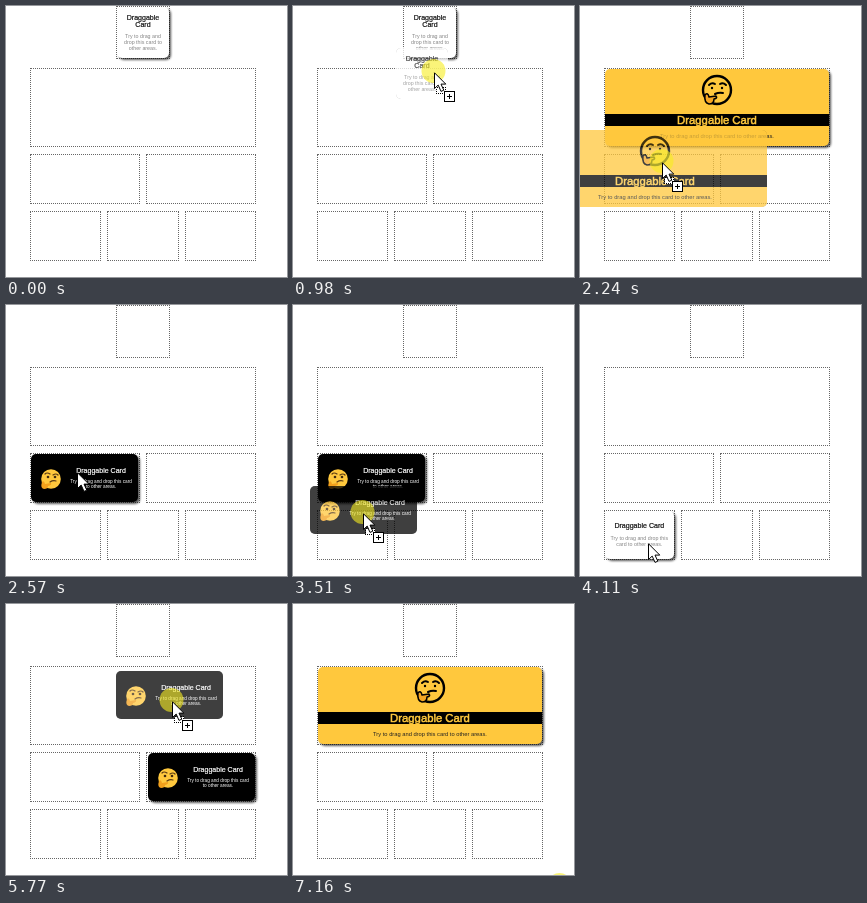
Write an HTML page that moves like this. It is 281x271 px and loops after 7.23 s.

```html
<!DOCTYPE html>
<html lang="en">
<head>
<meta charset="utf-8">
<title>Draggable card</title>
<style>
  html, body { margin: 0; width: 100%; height: 100%; overflow: hidden; background: #fff; }
  svg { position: absolute; inset: 0; width: 100%; height: 100%; }
  text { font-family: "Liberation Sans", Arial, sans-serif; text-anchor: middle; }
  .title { font-size: 7.05px; stroke: currentColor; stroke-width: .2px; fill: currentColor; }
  .big { font-size: 11.3px; stroke-width: .5px; }
  .note { font-size: 5.32px; fill: #858585; }
  .zone { position: absolute; box-sizing: border-box; border: 1px dotted #666; }
  .line { fill: none; stroke-linecap: round; stroke-linejoin: round; }
  #placed { filter: drop-shadow(2px 2px 1px rgba(0, 0, 0, .65)); }
  #ghost { opacity: .75; filter: drop-shadow(.5px 0 .5px rgba(0, 0, 0, .4)); }
</style>
</head>
<body>
<div id="zones"></div>
<svg viewBox="0 0 281 271">
  <defs>
    <g id="small" color="#111">
      <rect width="52" height="51" rx="5" fill="#fff"/>
      <text class="title" x="26" y="13">Draggable</text>
      <text class="title" x="26" y="20">Card</text>
      <text class="note" x="26" y="31">Try to drag and</text>
      <text class="note" x="26" y="37">drop this card to</text>
      <text class="note" x="26" y="43">other areas.</text>
    </g>

    <g id="wide" color="#ffc83d">
      <rect width="224" height="77" rx="5" fill="#ffc83d"/>
      <rect y="45" width="224" height="12"/>
      <g transform="translate(112 21)" class="line" stroke="#000" stroke-width="2">
        <circle r="14" stroke-width="2.4"/>
        <path d="M-8-5Q-5-8-2-6M3-6Q6-8 9-5M-2 4Q2 2 6 3"/>
        <path d="M-12 5Q-9 2-8 7L-1 6Q1 8-3 9Q-3 14-8 14Q-13 13-12 5Z" fill="#f5a623" stroke-width="1.5"/>
        <circle cx="-5" cy="-2" r="1.2" fill="#000" stroke="none"/>
        <circle cx="5" cy="-2" r="1.2" fill="#000" stroke="none"/>
      </g>
      <text class="title big" x="112" y="55">Draggable Card</text>
      <text class="note" x="112" y="69" style="font-size:5.75px;fill:#222">Try to drag and drop this card to other areas.</text>
    </g>

    <g id="half" color="#fff">
      <rect width="107" height="48" rx="5"/>
      <g transform="translate(20 25)">
        <circle r="9.8" fill="#ffc83d"/>
        <path class="line" d="M-6-5Q-4-7-1-5M2-4Q5-6 7-4M-1 3Q2 1 5 2" stroke="#5a3a12" stroke-width="1.2"/>
        <circle cx="-3" cy="-2" r="1.3" fill="#402a10"/>
        <circle cx="4" cy="-2" r="1.3" fill="#402a10"/>
        <path d="M-9 3Q-7 1-6 5L0 4Q1 6-3 7Q-3 10-7 10Q-11 9-9 3Z" fill="#f2a01c"/>
      </g>
      <text class="title" x="70" y="19">Draggable Card</text>
      <g style="font-size:4.73px" fill="#fff">
        <text x="70" y="28.8">Try to drag and drop this card</text>
        <text x="70" y="34">to other areas.</text>
      </g>
    </g>

    <g id="third" color="#111">
      <rect width="69" height="48" rx="5" fill="#fff"/>
      <text class="title" x="34.3" y="16.7">Draggable Card</text>
      <text class="note" x="34.3" y="29">Try to drag and drop this</text>
      <text class="note" x="34.3" y="35">card to other areas.</text>
    </g>
  </defs>

  <use id="placed"/>
  <use id="ghost"/>
  <g id="pointer">
    <circle id="press" cx="-.5" cy="-1" r="12" fill="#f6ec20" opacity=".6"/>
    <g id="copy" stroke="#000" fill="#fff" shape-rendering="crispEdges">
      <rect x="2.5" y="15.5" width="9" height="6" stroke-dasharray="1 1"/>
      <rect x="10.5" y="19.5" width="10" height="10"/>
      <path d="M13 24.5H18M15.5 22V27"/>
    </g>
    <path d="M.5.8V16.5L4.2 13.1L7 19.4L9.8 18.2L7 12.1H11.8Z" fill="#fff" stroke="#000"/>
  </g>
</svg>

<script>
const LOOP = 7230, STEP = 65;
const el = id => document.getElementById(id);

// x, y, width, height of the drop areas
const zones = [
  [110, 0, 54, 53], [24, 62, 226, 79],
  [24, 148, 110, 50], [140, 148, 110, 50],
  [24, 205, 71, 50], [101, 205, 72, 50], [179, 205, 71, 50]
];
el("zones").innerHTML = zones.map(([x, y, w, h]) =>
  `<div class="zone" style="left:${x}px;top:${y}px;width:${w}px;height:${h}px"></div>`).join("");

// Where the card rests from a given time on
const rests = [
  { at: 0, card: "small", x: 111, y: 1 },
  { at: 1440, card: "wide", x: 25, y: 63 },
  { at: 2440, card: "half", x: 25, y: 149 },
  { at: 3910, card: "third", x: 25, y: 206 },
  { at: 4970, card: "half", x: 142, y: 149 },
  { at: 5970, card: "wide", x: 25, y: 63 }
];

const drags = [
  { press: 780, grab: 850, drop: 1440, release: 1640, x: 149, y: 25 },
  { press: 2040, grab: 2040, drop: 2440, release: 2570, x: 144, y: 95 },
  { press: 3180, grab: 3245, drop: 3910, release: 4040, x: 78, y: 176 },
  { press: 4310, grab: 4375, drop: 4970, release: 5170, x: 68, y: 237 },
  { press: 5365, grab: 5430, drop: 5970, release: 6035, x: 198, y: 179 },
  { press: 7090, grab: LOOP, drop: LOOP, release: LOOP, x: 267, y: 282 }
];

// Pointer moves: start time, number of steps, end point
const moves = [
  [190, 3, 178, 121], [520, 5, 149, 25], [850, 6, 132, 107],
  [1640, 3, 144, 95], [2040, 5, 71, 167], [2840, 4, 78, 176],
  [3245, 9, 64, 232], [3975, 3, 68, 238], [4375, 9, 204, 175],
  [5170, 4, 198, 179], [5430, 6, 166, 97], [6100, 9, 246, 228],
  [6700, 4, 260, 284], [7090, 1, 267, 282]
];

const ease = p => (p + p * p * (3 - 2 * p)) / 2;

function pointerAt(t) {
  let x = 277, y = 316;
  for (const [start, steps, toX, toY] of moves) {
    if (t < start) break;
    const done = Math.min(1, (Math.floor((t - start) / STEP) + 1) / steps);
    const p = ease(done);
    x += (toX - x) * p;
    y += (toY - y) * p;
  }
  return { x: Math.round(x), y: Math.round(y) };
}

function place(node, card, x, y) {
  node.setAttribute("href", "#" + card);
  node.setAttribute("x", x);
  node.setAttribute("y", y);
}

const show = (node, on) => node.setAttribute("display", on ? "inline" : "none");

function draw(now) {
  const t = now % LOOP;
  const { x, y } = pointerAt(t);
  const rest = rests.findLast(r => t >= r.at);
  const drag = drags.find(d => t >= d.press && t < d.release);
  const dragging = Boolean(drag) && t >= drag.grab && t < drag.drop;

  place(el("placed"), rest.card, rest.x, rest.y);
  if (dragging) place(el("ghost"), rest.card, rest.x + x - drag.x, rest.y + y - drag.y);
  show(el("ghost"), dragging);
  show(el("copy"), dragging);
  show(el("press"), drag);
  el("pointer").setAttribute("transform", `translate(${x} ${y})`);
}

const origin = performance.now();
function tick() {
  draw(performance.now() - origin);
  requestAnimationFrame(tick);
}
tick();
</script>
</body>
</html>
```
